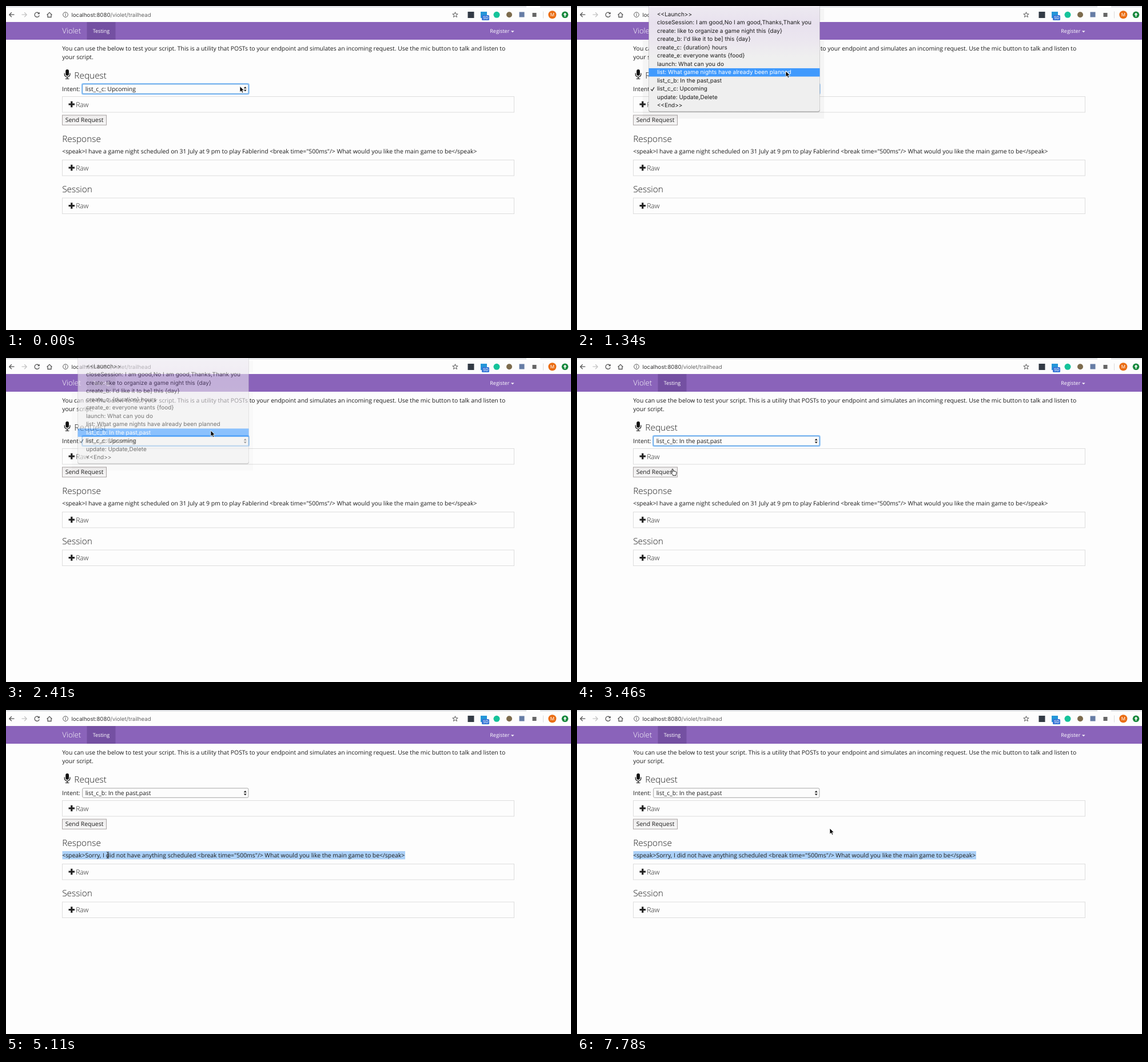
These frames come from a looping animation (988 px wide and 567 px high, 8000 ms). An HTML page:

```html
<!DOCTYPE html>
<html lang="en">
<head>
<meta charset="utf-8">
<title>Script tester</title>
<style>
html, body { margin: 0; width: 100%; height: 100%; overflow: hidden; background: #fdfdfd; }
svg { display: block; width: 100vw; height: 100vh; }
text { font: 10.41px "Open Sans", sans-serif; fill: #1c1c1c; text-rendering: geometricPrecision; white-space: pre; }
.ui { font: 9.99px Inter, sans-serif; }
.head { font-size: 15.4px; font-weight: 300; }
.raw { font-size: 12.1px; font-weight: 300; }
.nav { font-size: 9px; fill: #fff; }
.brand { font-size: 13.2px; font-weight: 300; fill: #fff; }
.line { fill: none; stroke: #555; stroke-width: 1.3; }
</style>
</head>
<body>
<svg viewBox="0 0 988 567">
  <defs>
    <linearGradient id="glass" x2="0" y2="1">
      <stop offset="0" stop-color="#eeebf1"/>
      <stop offset=".2" stop-color="#e8e1ee"/>
      <stop offset=".34" stop-color="#ebe6ef"/>
      <stop offset=".5" stop-color="#efefef"/>
    </linearGradient>
    <linearGradient id="button" x2="0" y2="1">
      <stop offset="0" stop-color="#eeecec"/>
      <stop offset="1" stop-color="#f6f6f6"/>
    </linearGradient>
    <g id="panel">
      <rect x="98.5" y=".5" width="790" height="27.5" fill="#fdfdfd" stroke="#ddd"/>
      <path d="M109.5 14H120M114.75 8.8V19.2" stroke="#222" stroke-width="3.2"/>
      <text class="raw" x="122.2" y="18.5">Raw</text>
    </g>
  </defs>
  <rect width="988" height="567" fill="#fdfdfd"/>

  <!-- browser bar -->
  <path d="M0 0H910V2.5H0ZM934 0H988V2.5H934Z" fill="#dfe1e5"/>
  <g class="line">
    <path d="M14.5 15.2H6M9.8 11.2L5.8 15.2L9.8 19.2"/>
    <path d="M27.5 15.2H36M32.2 11.2L36.2 15.2L32.2 19.2" stroke="#c4c4c4"/>
    <path d="M57.6 13A4.1 4.1 0 1 0 58.2 16.3"/>
    <path d="M58.8 10.5V14.2H55Z" fill="#555" stroke="none"/>
    <path d="M71.5 15.6L76 11.3L80.5 15.6M73 14.6V19.5H79V14.6"/>
    <circle cx="104" cy="15.2" r="4.3" stroke-width="1"/>
    <path d="M104 14.6V17.6M104 12.6V13.7" stroke-width="1.1"/>
    <path d="M785.5 10.7L786.8 14H790.2L787.5 16.1L788.5 19.5L785.5 17.5L782.5 19.5L783.5 16.1L780.8 14H784.2Z" stroke-width="1"/>
  </g>
  <text class="ui" x="114.5" y="18.7" style="font-size:9.65px;fill:#666"><tspan fill="#333">localhost:8080</tspan>/violet/trailhead</text>
  <rect x="807.5" y="10" width="11" height="11" fill="#323a45"/>
  <rect x="830" y="10" width="11" height="11" fill="#2496d8"/>
  <rect x="832" y="16" width="13" height="9" rx="1.5" fill="#3474d6"/>
  <text class="ui" x="834" y="23.2" style="font-size:7.2px;fill:#fff">SD</text>
  <circle cx="858" cy="15.3" r="5.5" fill="#15c39a"/>
  <circle cx="880" cy="15.3" r="5" fill="#7c6b4c"/>
  <rect x="897.5" y="10.5" width="9" height="9" fill="#667da5"/>
  <rect x="920.5" y="12" width="7" height="7" fill="#666"/>
  <path d="M939.5 9.5V21.5" stroke="#ddd"/>
  <circle cx="955.3" cy="15.3" r="7" fill="#ea6d13"/>
  <text class="ui" x="955.3" y="18.2" text-anchor="middle" style="font-size:8px;fill:#fff">M</text>
  <circle cx="977.5" cy="15.3" r="5.8" fill="#16883c"/>
  <path d="M977.5 11.7L974.4 15.2H976.5V18.5H978.5V15.2H980.6Z" fill="#fff"/>

  <!-- navigation -->
  <rect y="28" width="988" height="31" fill="#8a63ba"/>
  <rect x="141.5" y="28" width="50" height="31" fill="#7450a2"/>
  <text class="brand" x="98.3" y="48.4">Violet</text>
  <text class="nav" x="151.7" y="47.3">Testing</text>
  <text class="nav" x="846.3" y="47.3">Register</text>
  <path d="M883 43.5H888.6L885.8 46.3Z" fill="#fff"/>

  <!-- page -->
  <text x="98.3" y="78.3">You can use the below to test your script. This is a utility that POSTs to your endpoint and simulates an incoming request. Use the mic button to talk and listen to</text>
  <text x="98.3" y="93.1">your script.</text>
  <rect x="104.2" y="111" width="5.8" height="11" rx="2.9" fill="#111"/>
  <path d="M102.3 117.5V119.5A4.8 4.8 0 0 0 111.9 119.5V117.5M107.1 124V127.3M103.8 127.5H110.4" fill="none" stroke="#111" stroke-width="1.2"/>
  <text class="head" x="119.3" y="127">Request</text>
  <text x="98" y="149.2">Intent:</text>
  <rect id="ring" x="132.9" y="136" width="291.8" height="18.2" rx="2" fill="none" stroke="#8fc3f7" stroke-width="2"/>
  <rect id="select" x="133.7" y="136.9" width="290.2" height="16.4" rx="2" fill="#fcfcfc"/>
  <text id="choice" x="138.7" y="149.2"></text>
  <path d="M415.7 144.2L418.2 141L420.7 144.2ZM415.7 146.4L418.2 149.6L420.7 146.4Z" fill="#222"/>
  <use href="#panel" y="158"/>
  <rect x="98.5" y="191" width="77" height="17.3" fill="url(#button)" stroke="#a9a3a3"/>
  <text x="103.8" y="203.2">Send Request</text>
  <text class="head" x="98.2" y="237.6">Response</text>
  <rect id="mark" y="247" height="14.3" fill="#acd1f8"/>
  <text id="reply" x="98.2" y="257.9"></text>
  <use href="#panel" y="269"/>
  <text class="head" x="98.2" y="326.4">Session</text>
  <use href="#panel" y="335.5"/>

  <!-- drop-down -->
  <g id="menu">
    <path d="M115 60H432V197H115ZM424 5H432V25H424Z" fill="#000" opacity=".03"/>
    <rect x="125" y="-6" width="300" height="191.8" rx="4" fill="#000" opacity=".28"/>
    <rect x="125.5" y="-6" width="299" height="190.3" rx="4" fill="url(#glass)"/>
    <rect id="bar" x="125.5" width="299" height="14.6" fill="#409afd"/>
    <path id="tick" d="M129.2 145.6L131.4 148.2L135 142.2" fill="none" stroke-width="1.2"/>
  </g>

  <g id="cursor">
    <path id="arrow" d="M0 0V10.2L2.4 8L4 11.6L5.8 10.8L4.2 7.3H7.4Z" fill="#000" stroke="#fff" stroke-width=".8"/>
    <path id="hand" d="M-1 .8Q0 -.6 1 .8L1.8 4.2L3 4L4.6 4.4L6 5Q7.4 5.4 7 7.4L6 10.2V11.6H.6V10.4L-2.6 6.4Q-3 5 -1.6 5.2L0 6.4Z" fill="#fff" stroke="#111" stroke-width=".9"/>
    <path id="beam" d="M-2 -5.5Q0 -5.5 0 -4V4Q0 5.5 -2 5.5M2 -5.5Q0 -5.5 0 -4M0 4Q0 5.5 2 5.5M-1 1.8H1" fill="none" stroke="#222" stroke-width=".9"/>
  </g>
</svg>
<script>
const LOOP = 8000, ROW = 14.53, TOP = 14, CHECKED = 9;
const el = id => document.getElementById(id);
const set = (id, attrs) => { for (const k in attrs) el(id).setAttribute(k, attrs[k]); };
const show = (id, on) => set(id, { visibility: on ? "visible" : "hidden" });

const options = [
  "<<Launch>>",
  "closeSession: I am good,No I am good,Thanks,Thank you",
  "create: like to organize a game night this {day}",
  "create_b: I'd like it to be] this {day}",
  "create_c: {duration} hours",
  "create_e: everyone wants {food}",
  "launch: What can you do",
  "list: What game nights have already been planned",
  "list_c_b: In the past,past",
  "list_c_c: Upcoming",
  "update: Update,Delete",
  "<<End>>"
];
const rows = options.map((label, i) => {
  const row = document.createElementNS("http://www.w3.org/2000/svg", "text");
  row.setAttribute("class", "ui");
  row.setAttribute("x", 140);
  row.setAttribute("y", TOP + i * ROW + 3.6);
  row.textContent = label;
  el("menu").append(row);
  return row;
});

const ending = ' <break time="500ms"/> What would you like the main game to be</speak>';
const replies = [
  "<speak>I have a game night scheduled on 31 July at 9 pm to play Fablerind" + ending,
  "<speak>Sorry, I did not have anything scheduled" + ending
];

// Pointer moves: first step, last step, number of steps, end point
const moves = [
  [810, 1340, 5, 365, 114],
  [1580, 1850, 3, 358, 127],
  [2560, 3160, 5, 172, 188],
  [3460, 3460, 1, 167, 194],
  [4060, 4510, 4, 178, 254],
  [6000, 6890, 7, 636, 266],
  [7190, 7190, 1, 664, 263],
  [7340, 7780, 4, 442, 207]
];

function pointer(t) {
  let x = 409, y = 140.5;
  for (const [start, end, n, toX, toY] of moves) {
    if (t < start) break;
    const gap = (end - start) / (n - 1 || 1) || 1;
    const part = Math.min(n, Math.floor((t - start) / gap + 1e-6) + 1) / n;
    x += (toX - x) * part;
    y += (toY - y) * part;
  }
  return [x, y];
}

function draw(t) {
  const [x, y] = pointer(t);
  const open = t >= 450 && t < 2560, focused = t < 3910;

  set("menu", { display: open ? "inline" : "none", opacity: t < 2410 ? 1 : 0.6 });
  const active = Math.round((y - TOP) / ROW);
  set("bar", { y: TOP + active * ROW - 6.8 });
  rows.forEach((row, i) => row.style.fill = i === active ? "#fff" : "#1c1c1c");
  set("tick", { stroke: active === CHECKED ? "#fff" : "#222" });

  el("choice").textContent = options[t < 2560 ? 9 : 8];
  show("ring", focused);
  set("select", { stroke: focused ? "#5b9fe0" : "#a6a6a6" });
  el("reply").textContent = replies[t < 4210 ? 0 : 1];
  const word = t < 5110;
  set("mark", { x: word ? 175.6 : 98.5, width: t < 4960 ? 0 : word ? 15.6 : 599.5 });

  const onButton = x > 98 && x < 176 && y > 191 && y < 209;
  const onReply = y > 246 && y < 262;
  show("hand", onButton);
  show("beam", onReply);
  show("arrow", !onButton && !onReply);
  set("cursor", { transform: `translate(${x} ${y})` });
}

const begin = performance.now();
function tick() {
  draw((performance.now() - begin) % LOOP);
  requestAnimationFrame(tick);
}
tick();
</script>
</body>
</html>
```
